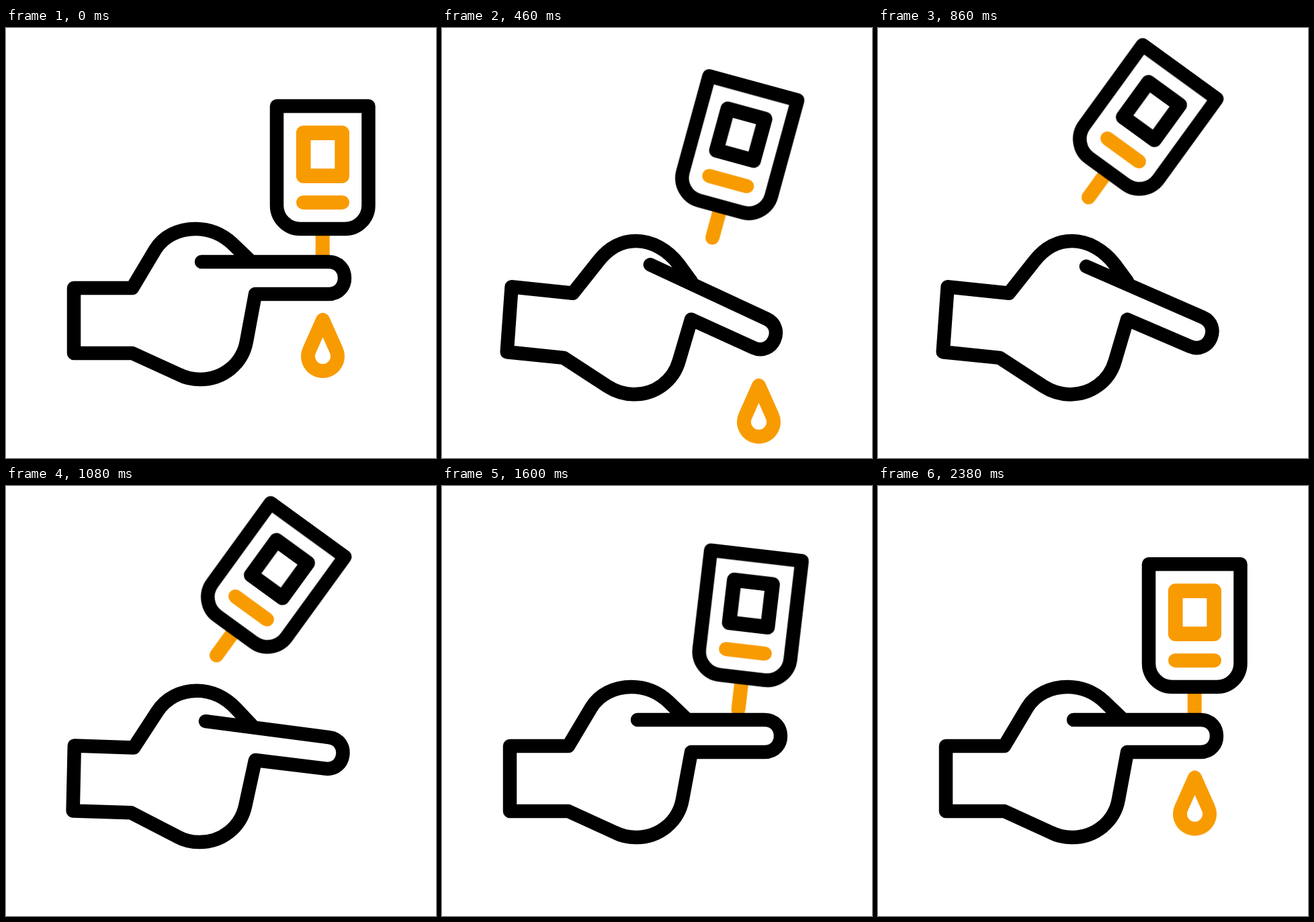
Animation of 640x640 px, one loop 2.4 s. Source, as an HTML page without scripts:

```html
<!DOCTYPE html>
<html lang="en">
<head>
<meta charset="utf-8">
<title>Glucose test</title>
<style>
  html, body { margin: 0; width: 100%; height: 100%; overflow: hidden; background: #fff; }
  svg { display: block; width: 100%; height: 100%; }

  svg * {
    animation-duration: 2.4s;
    animation-iteration-count: infinite;
    animation-timing-function: cubic-bezier(.333, 0, .667, 1);
  }
  .line { fill: none; stroke: #000; stroke-width: 20.5; stroke-linecap: round; stroke-linejoin: round; }
  .accent { stroke: #f89b00; stroke-width: 21; }

  .hand { animation-name: point; }
  .meter { animation-name: swing; transform-origin: 471.5px 229px; }
  .screen { stroke-width: 21.7; animation-name: blink; animation-timing-function: step-end; }
  .drop { animation-name: fall; }

  /* rest, finger pressed down, finger easing up before the return */
  @keyframes point {
    0%, 3.2%, 52.5%, 100% {
      d: path("M291 348 L480 348 C512 348 512 396 480 396 L371 396 L358 466 C352 500 323 523 289 523 C278 523 268 521 258 516 L188 484 L101 484 L101 387 L188 387 L222 330 C234 310 257 299 282 299 C303 299 322 307 337 321 L364 347");
    }
    24.2% {
      d: path("M313 353 L483.5 447 C511.5 462.3 488.5 504.3 460.5 489 L371 440 L352 500 C343 530 316 549 285 549 C270 549 256 544 244 536 L180 492 L96 482 L104 385 L196 396 L235 349 C250 331 268 320 290 320 C314 320 338 334 355 357 L372 382");
    }
    30.8% {
      d: path("M313 356 L483.3 443.6 C511.9 458 490.3 500.8 461.7 486.4 L371 440 L352 500 C343 530 316 549 285 549 C270 549 256 544 244 536 L180 492 L96 482 L104 385 L196 396 L235 349 C250 331 268 320 290 320 C314 320 338 334 355 357 L372 382");
    }
  }
  @keyframes swing {
    0%, 9.4%, 72.6%, 100% { transform: translate(0, 0) rotate(0deg); }
    31.2%, 51.2% { transform: translate(-88.5px, -72.3px) rotate(36deg); }
  }
  @keyframes blink {
    0%, 21.5%, 45.7%, 69.9%, 100% { stroke: #f89b00; }
    9.5%, 33.6%, 57.8% { stroke: #000; }
  }
  @keyframes fall {
    0%, 2.1% { transform: translateY(0); opacity: 1; }
    23.7% { transform: translateY(110px); opacity: 1; }
    23.71% { transform: translateY(-110px); opacity: 0; }
    78.9% { transform: translateY(-110px); opacity: 0; }
    78.91% { transform: translateY(-110px); opacity: 1; }
    100% { transform: translateY(0); opacity: 1; }
  }
</style>
</head>
<body>
<svg viewBox="0 0 640 640">
  <clipPath id="below"><rect y="396" width="640" height="244"/></clipPath>

  <g clip-path="url(#below)">
    <path class="line accent drop" d="M471.5 434.5 L451.5 479.4 A22 22 0 1 0 491.5 479.4 Z"/>
  </g>

  <g class="meter">
    <path class="line accent" d="M471.2 300 V347"/>
    <path class="line" d="M403 116.3 H539.5 V264 a35 35 0 0 1 -35 35 H438 a35 35 0 0 1 -35 -35 Z"/>
    <rect class="line accent screen" x="442.7" y="156.2" width="57.5" height="64"/>
    <path class="line accent" d="M442.5 259.7 H500.5"/>
  </g>

  <path class="line hand" d="M291 348 L480 348 C512 348 512 396 480 396 L371 396 L358 466 C352 500 323 523 289 523 C278 523 268 521 258 516 L188 484 L101 484 L101 387 L188 387 L222 330 C234 310 257 299 282 299 C303 299 322 307 337 321 L364 347"/>
</svg>
</body>
</html>
```
